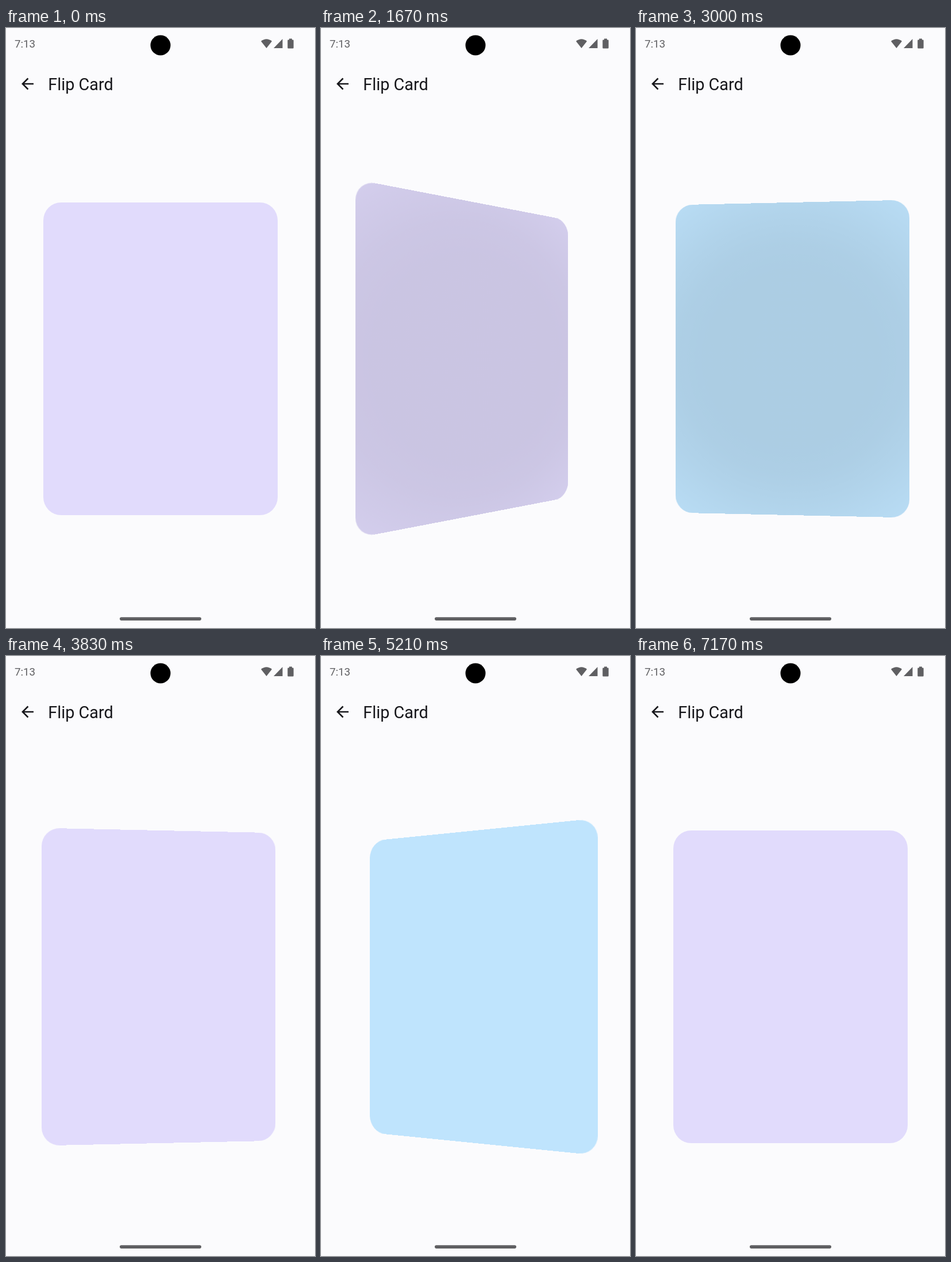
Write an HTML page that moves like this. It is 538x1042 px and loops after 7.21 s.

```html
<!DOCTYPE html>
<html lang="en">
<head>
<meta charset="utf-8">
<title>Flip Card</title>
<style>
  html, body { margin: 0; width: 100%; height: 100%; overflow: hidden; }
  body { position: relative; background: #fbfbfd; }
  svg { position: absolute; left: 0; top: 0; }
  text { font-family: Roboto, sans-serif; }
  #card {
    position: absolute; left: 65px; top: 303px;
    width: 408px; height: 543px; border-radius: 31px;
    background-color: #e1dbfc;
  }
</style>
</head>
<body>
<div id="card"></div>
<svg width="538" height="1042" viewBox="0 0 538 1042">
  <g fill="#5f5f62">
    <text x="15" y="34.3" font-size="18.7">7:13</text>
    <path d="M444 23Q453.500 15.500 463 23L453.500 35Z"/>
    <path d="M481.500 19V35H466Z"/>
    <path d="M493 18.500h5v2h1.500q1.200 0 1.200 1.200v12.600q0 1.200-1.200 1.200h-8q-1.200 0-1.200-1.200v-12.600q0-1.200 1.200-1.200h1.500Z"/>
    <rect x="198" y="1023.300" width="142" height="5.600" rx="2.800"/>
  </g>
  <circle cx="269" cy="30" r="17.500"/>
  <g fill="#17171b">
    <path transform="translate(21.800 81.300) scale(1.308)"
      d="M20 11H7.830l5.590-5.590L12 4l-8 8 8 8 1.410-1.410L7.830 13H20z"/>
    <text x="73.300" y="107.500" font-size="28.800">Flip Card</text>
  </g>
</svg>
<script>
  const LOOP = 7210, FLIP = 1027;
  const STARTS = [1396, 2902, 4390, 5835];
  const LEAD = 150, GROW = 450, FADE = 375, RADIUS = 360;
  const FRONT = '#e1dbfc', BACK = '#bfe4fd';
  const card = document.getElementById('card');
  const clamp = v => Math.min(1, Math.max(0, v));

  // Cubic timing curve with end heights 0 and 1
  function ease(x1, x2, u) {
    let lo = 0, hi = 1, t = 0.5;
    for (let i = 0; i < 24; i++) {
      t = (lo + hi) / 2;
      const x = 3 * (1 - t) ** 2 * t * x1 + 3 * (1 - t) * t * t * x2 + t ** 3;
      if (x < u) lo = t; else hi = t;
    }
    return t * t * (3 - 2 * t);
  }

  function angleAt(t) {
    return STARTS.reduce((sum, s, i) => {
      const u = clamp((t - s) / FLIP);
      const turn = u === 0 || u === 1 ? u : ease(0.42, 0.58, u);
      return sum + (i % 2 ? -180 : 180) * turn;
    }, 0);
  }

  function rippleAt(t) {
    const s = STARTS.find(s => t >= s - LEAD && t < s - LEAD + GROW + FADE);
    if (s === undefined) return 'none';
    const age = t - s + LEAD;
    const r = RADIUS * ease(0.4, 0.2, clamp(age / GROW));
    const alpha = 0.1 * clamp(age / 75) * (1 - clamp((age - GROW) / FADE));
    const stops = [];
    for (let k = 0; k <= 6; k++) {
      const q = k / 6, a = alpha * (1 - q * q * (3 - 2 * q));
      stops.push(`rgba(0,0,0,${a.toFixed(4)}) ${(r * (0.5 + q)).toFixed(1)}px`);
    }
    return `radial-gradient(circle at center, ${stops.join(', ')})`;
  }

  function draw(now) {
    const t = now % LOOP, angle = angleAt(t);
    card.style.transform = `perspective(715px) rotateY(${angle.toFixed(3)}deg)`;
    card.style.backgroundColor = angle < 90 ? FRONT : BACK;
    card.style.backgroundImage = rippleAt(t);
  }

  const begin = performance.now();
  function tick() {
    draw(performance.now() - begin);
    requestAnimationFrame(tick);
  }
  tick();
</script>
</body>
</html>
```
